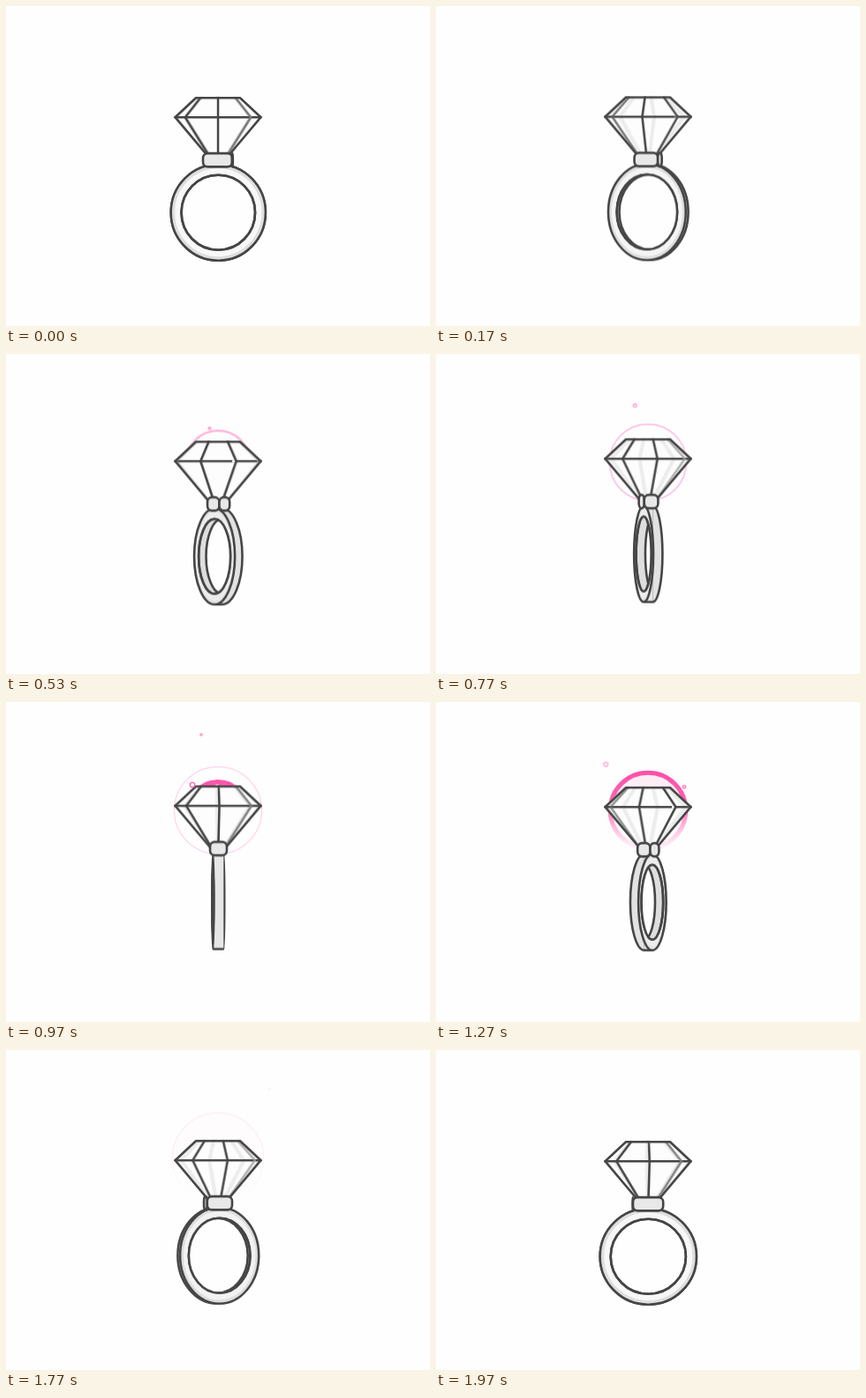
Animation of 480x363 px, one loop 2010 ms. Source, as an HTML page without scripts:

```html
<!DOCTYPE html>
<html lang="en">
<head>
<meta charset="utf-8">
<title>Turning diamond ring</title>
<style>
/* ring half-width, depth, facing side; collar left, right and split */
@property --w { syntax: "<length>"; inherits: true; initial-value: 54px; }
@property --s { syntax: "<length>"; inherits: true; initial-value: 0px; }
@property --d { syntax: "<number>"; inherits: true; initial-value: -1; }
@property --l { syntax: "<length>"; inherits: true; initial-value: 223px; }
@property --r { syntax: "<length>"; inherits: true; initial-value: 257px; }
@property --m { syntax: "<length>"; inherits: true; initial-value: 257px; }

html, body { margin: 0; width: 100%; height: 100%; overflow: hidden; background: #fefefe; }
svg { display: block; width: 100vw; height: 100vh; animation: turn 2010ms linear infinite; }

@keyframes turn {
  0%     { --w: 53.6px; --s: 0px;    --d: -1; --l: 223px;   --r: 256.8px; --m: 256px; }
  16.42% { --w: 34.8px; --s: 5.5px;  --l: 226px;   --r: 254.6px; --m: 246.6px; }
  26.37% { --w: 23.1px; --s: 8.4px;  --l: 228px;   --r: 253.2px; --m: 241.5px; }
  48.26% { --w: .9px;   --s: 12px;   --l: 231px;   --r: 250px;   --m: 231px; }
  49.99% { --w: .9px;   --s: 12px;   --d: -1; --l: 231px; --r: 250px; --m: 231px; }
  50%    { --w: .9px;   --s: 12px;   --d: 1;  --l: 231px; --r: 250px; --m: 250px; }
  63.18% { --w: 15.7px; --s: 9.2px;  --l: 228.2px; --r: 252.4px; --m: 242.5px; }
  76.12% { --w: 32.4px; --s: 6px;    --l: 225.8px; --r: 254.6px; --m: 233.6px; }
  98%    { --w: 54.6px; --s: 0px;    --l: 222.6px; --r: 257.2px; --m: 223px; }
  100%   { --w: 54.6px; --s: 0px;    --d: 1; --l: 222.6px; --r: 257.2px; --m: 223px; }
}

.ink { stroke: #454545; stroke-width: 2.6; stroke-linejoin: round; stroke-linecap: round; fill: none; }

.bob { animation: bob 2010ms cubic-bezier(.37, 0, .63, 1) infinite; }
@keyframes bob { 50% { transform: translateY(-8.5px); } }

ellipse { cy: 234.2px; }
.front { cx: calc(240.3px + var(--d) * var(--s) / 2); }
.back { cx: calc(240.3px - var(--d) * var(--s) / 2); }
.outer { rx: var(--w); ry: 54.5px; }
.rim { rx: calc(var(--w) * .945); ry: 51.5px; stroke: #dedede; stroke-width: calc(var(--w) * .055); }
.hole { rx: calc(var(--w) * .78); ry: 42.5px; }
.side { x: calc(240.3px - var(--s) / 2); width: var(--s); stroke: none; }
.metal { stroke: none; animation: metal 2010ms linear infinite; }
@keyframes metal {
  0%, 100% { fill: #f8f8f8; }
  26%, 76% { fill: #ececec; }
}

.collar rect { y: 167.1px; height: 15.3px; rx: 5.3px; fill: #e8e8e8; }
.collar .a { x: var(--l); width: calc(var(--m) - var(--l)); }
.collar .b { x: var(--m); width: calc(var(--r) - var(--m)); }

.facet { vector-effect: non-scaling-stroke; animation: facet 4020ms linear infinite; }
.rear .facet { stroke: #ececec; stroke-width: 4; animation: rear 4020ms linear infinite reverse; }
.facet:nth-child(2) { animation-delay: -1005ms; }
.facet:nth-child(3) { animation-delay: -2010ms; }
.facet:nth-child(4) { animation-delay: -3015ms; }
@keyframes facet {
  0%     { transform: scaleX(.985); stroke: #ddd; opacity: 0; }
  12.5%  { transform: scaleX(.966); stroke: #ccc; opacity: .5; }
  25%    { transform: scaleX(.766); stroke: #777; opacity: 1; }
  31.25% { transform: scaleX(.66); stroke: #454545; }
  37.5%  { transform: scaleX(.45); }
  43.75% { transform: scaleX(.235); }
  50%    { transform: scaleX(0); }
  56.25% { transform: scaleX(-.196); }
  62.5%  { transform: scaleX(-.385); }
  68.75% { transform: scaleX(-.58); }
  75%    { transform: scaleX(-.766); stroke: #454545; opacity: 1; }
  87.5%  { transform: scaleX(-.966); stroke: #999; opacity: .5; }
  100%   { transform: scaleX(-.985); stroke: #ddd; opacity: 0; }
}
@keyframes rear {
  0%    { transform: scaleX(.985); }
  12.5% { transform: scaleX(.966); }
  25%   { transform: scaleX(.766); }
  37.5% { transform: scaleX(.423); }
  50%   { transform: scaleX(0); }
  62.5% { transform: scaleX(-.423); }
  75%   { transform: scaleX(-.766); }
  87.5% { transform: scaleX(-.966); }
  100%  { transform: scaleX(-.985); }
}
.gap { stroke: #fdfdfd; stroke-width: 3.4; animation: gap 1005ms linear infinite; }
@keyframes gap {
  0%, 15% { transform: translateX(30px); opacity: 0; }
  25%     { transform: translateX(27.6px); opacity: 1; }
  53%     { transform: translateX(16px); }
  60%     { opacity: 1; }
  75%, 100% { transform: translateX(7px); opacity: 0; }
}

.burst { cx: 240px; cy: 123px; fill: none; opacity: 0; }
.soft { stroke: #ffa6d6; animation: soft 2010ms linear infinite; }
@keyframes soft {
  0%, 8%  { r: 12px; stroke-width: 3px; opacity: 0; }
  10%     { opacity: 1; }
  16.42%  { r: 28.3px; stroke-width: 3px; opacity: 1; }
  26.37%  { r: 36px; stroke-width: 2.8px; opacity: .75; }
  48.26%  { r: 49.5px; stroke-width: 1.5px; opacity: .42; }
  55%, 100% { r: 51px; stroke-width: .6px; opacity: 0; }
}
.bold { stroke: url(#fade); fill: url(#glow); animation: bold 2010ms linear infinite; }
@keyframes bold {
  0%, 40% { r: 16px; stroke-width: 8px; opacity: 0; }
  42%     { opacity: 1; }
  48.26%  { r: 31.5px; stroke-width: 7px; opacity: 1; }
  63.18%  { r: 42.7px; stroke-width: 5px; opacity: 1; }
  76.12%  { r: 50px; stroke-width: 3px; opacity: .9; }
  90%, 100% { r: 52px; stroke-width: .8px; opacity: 0; }
}

.dot { fill: none; stroke: #ff85c0; stroke-width: 1.3; opacity: 0; }
.d1 { animation: d1 2010ms linear infinite; }
.d2 { animation: d2 2010ms linear infinite; }
.d3 { animation: d3 2010ms linear infinite; }
@keyframes d1 {
  0%, 21% { transform: translate(233.5px, 98px); r: 1px; opacity: 0; }
  23%     { opacity: 1; }
  26.37%  { transform: translate(230.5px, 84.3px); r: 1.2px; opacity: 1; }
  36%     { r: 2px; }
  48.26%  { transform: translate(221px, 37px); r: 1.2px; opacity: .9; }
  57%, 100% { transform: translate(218px, 27px); r: .6px; opacity: 0; }
}
@keyframes d2 {
  0%, 43% { transform: translate(218px, 102px); r: 2.4px; opacity: 0; }
  45%     { opacity: 1; }
  48.26%  { transform: translate(211px, 94px); r: 2.7px; stroke: #ff62b0; opacity: 1; }
  63.18%  { transform: translate(192.3px, 70.7px); r: 2.4px; stroke: #ff9ccb; opacity: .9; }
  72%, 100% { transform: translate(188px, 65px); r: 1px; opacity: 0; }
}
@keyframes d3 {
  0%, 58% { transform: translate(276px, 108px); r: 1.5px; opacity: 0; }
  61%     { opacity: 1; }
  63.18%  { transform: translate(281px, 96.4px); r: 1.7px; stroke: #ff6ab4; opacity: 1; }
  76.12%  { transform: translate(294.5px, 66.5px); r: 1.8px; opacity: 1; }
  90%, 100% { transform: translate(299px, 41px); r: .7px; opacity: 0; }
}
</style>
</head>
<body>
<svg viewBox="0 0 480 363">
  <defs>
    <linearGradient id="fade" gradientUnits="userSpaceOnUse" x1="0" y1="75" x2="0" y2="174">
      <stop offset="0" stop-color="#ff4fa8"/>
      <stop offset=".42" stop-color="#ff62b2"/>
      <stop offset="1" stop-color="#ffb5da" stop-opacity="0"/>
    </linearGradient>
    <linearGradient id="glow" gradientUnits="userSpaceOnUse" x1="0" y1="75" x2="0" y2="165">
      <stop offset="0" stop-color="#ffebf5"/>
      <stop offset="1" stop-color="#ffebf5" stop-opacity="0"/>
    </linearGradient>
    <clipPath id="inside"><ellipse class="front hole"/></clipPath>
    <path id="gem" d="M215 104.3H265L288.5 126.2 247.5 175H232.5L191.5 126.2Z"/>
  </defs>

  <circle class="burst soft"/>
  <circle class="burst bold"/>

  <g class="bob">
    <g class="ink">
      <ellipse class="back outer" fill="#e2e2e2"/>
      <rect class="side" y="178.4" height="111.6" fill="#454545"/>
      <rect class="side" y="181" height="106.4" fill="#e6e6e6"/>
      <ellipse class="front outer metal"/>
      <ellipse class="front rim"/>
      <ellipse class="front outer"/>
      <ellipse class="front hole" fill="#dedede"/>
      <g clip-path="url(#inside)"><ellipse class="back hole" fill="#fefefe"/></g>
      <ellipse class="front hole"/>
    </g>

    <use href="#gem" fill="#fdfdfd"/>
    <g class="rear ink" transform="translate(240)">
      <path class="facet" d="M25 104.3 48.5 126.2 7.5 175"/>
      <path class="facet" d="M25 104.3 48.5 126.2 7.5 175"/>
      <path class="facet" d="M25 104.3 48.5 126.2 7.5 175"/>
      <path class="facet" d="M25 104.3 48.5 126.2 7.5 175"/>
    </g>
    <path class="ink" d="M191.5 126.2H288.5"/>
    <path class="gap" d="M240 126.2h4"/>
    <g class="ink" transform="translate(240)">
      <path class="facet" d="M26 104.3 48.5 126.2 9 175"/>
      <path class="facet" d="M26 104.3 48.5 126.2 9 175"/>
      <path class="facet" d="M26 104.3 48.5 126.2 9 175"/>
      <path class="facet" d="M26 104.3 48.5 126.2 9 175"/>
    </g>
    <use class="ink" href="#gem"/>

    <g class="collar ink">
      <rect class="a"/>
      <rect class="b"/>
    </g>
  </g>

  <circle class="dot d1"/>
  <circle class="dot d2"/>
  <circle class="dot d3"/>
</svg>
</body>
</html>
```
